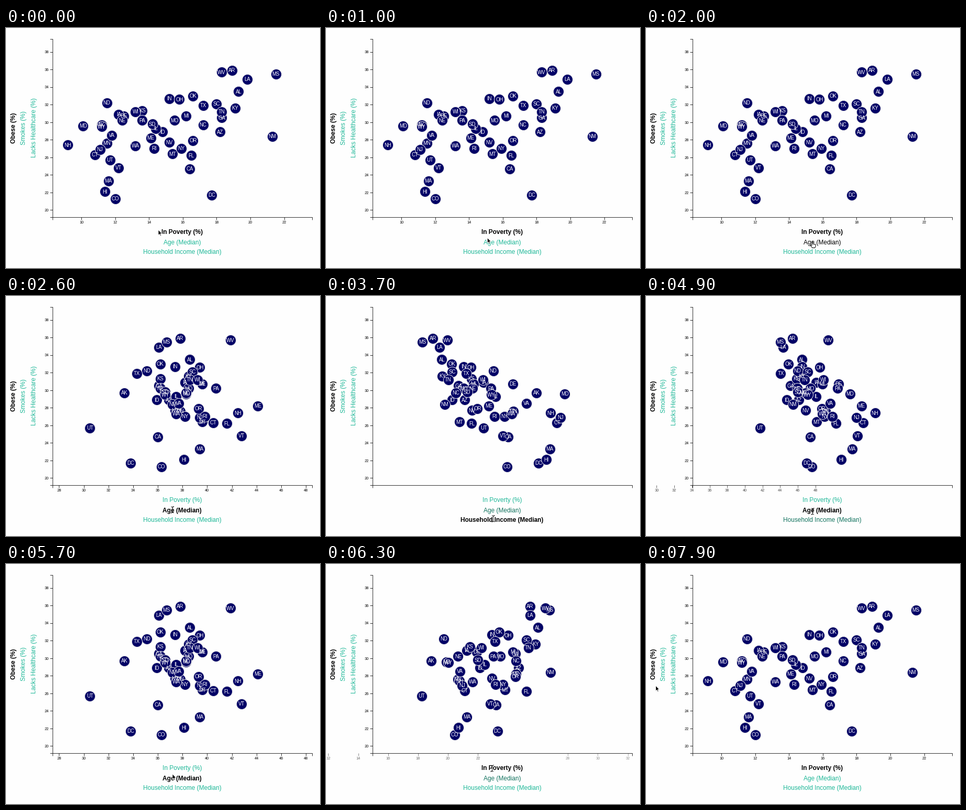
Animation of 600 by 458 pixels, one loop 8 s. Source, as a matplotlib script:

```python
import numpy as np
import matplotlib.pyplot as plt
from matplotlib.animation import FuncAnimation
from matplotlib.patches import Polygon

W, H, DPI = 600, 458, 100
STEP, FRAMES = 100, 80
MOVE_MS = 400
LEFT, RIGHT, TOP, BOTTOM = 88.5, 585, 20.8, 361.3
TEAL, NAVY = np.array([0x1f, 0xb8, 0x98]) / 255, "#000066"

CODES = ("AL AK AZ AR CA CO CT DE DC FL GA HI ID IL IN IA KS KY LA ME MD MA MI MN MS MO "
         "MT NE NV NH NJ NM NY NC ND OH OK OR PA RI SC SD TN TX UT VT VA WA WV WI WY").split()
POVERTY = np.array([
    19.3, 11.2, 18.2, 18.9, 16.4, 12, 10.8, 12.5, 17.7, 16.5, 18.3, 11.4, 14.8, 14.4, 15.2, 12.2, 13.6,
    19.1, 19.8, 14.1, 10.1, 11.6, 16.2, 11.5, 21.5, 15.5, 15.4, 12.4, 15.2, 9.2, 11.1, 21.3, 15.9, 17.2,
    11.5, 15.8, 16.6, 16.6, 13.6, 14.3, 18, 14.2, 18.3, 17.2, 11.7, 12.2, 11.8, 13.2, 18.3, 13.2, 11.2])
AGE = np.array([
    38.6, 33.3, 36.9, 37.8, 36, 36.3, 40.5, 39.6, 33.8, 41.6, 36.1, 38.1, 35.9, 37.5, 37.4, 38.2, 36.2,
    38.5, 36.1, 44.1, 38.3, 39.4, 39.6, 37.8, 36.7, 38.5, 39.6, 36.2, 37.4, 42.5, 39.4, 37.2, 38.2, 38.3,
    35.1, 39.4, 36.2, 39.3, 40.7, 39.8, 38.8, 36.6, 38.6, 34.3, 30.5, 42.8, 37.7, 37.5, 41.9, 39.2, 36.6])
INCOME = 1000 * np.array([
    42.8, 71.6, 50.1, 41.3, 61.9, 61.3, 70, 59.7, 71.6, 47.5, 49.3, 69.6, 47.9, 57.4, 49.4, 53.7, 52.5,
    43, 44.6, 49.5, 74, 69.2, 49.8, 61.5, 39.7, 48.4, 46.3, 52.7, 51.5, 66.5, 71.9, 44.8, 58.9, 46.6,
    59, 49.3, 47.5, 51.1, 53.2, 54.9, 45.2, 51, 44.4, 53, 60.9, 54.2, 64.9, 61.4, 41.1, 52.6, 57.1])
OBESITY = np.array([
    33.5, 29.7, 28.9, 35.9, 24.7, 21.3, 26.3, 30.7, 21.7, 26.2, 30.5, 22.1, 28.9, 29.3, 32.7, 30.9, 31.3,
    31.6, 34.9, 28.2, 29.6, 23.3, 30.7, 27.6, 35.5, 30.2, 26.4, 30.2, 27.7, 27.4, 26.9, 28.4, 27, 29.7,
    32.2, 32.6, 33, 27.9, 30.2, 27, 32.1, 29.8, 31.2, 31.9, 25.7, 24.8, 28.5, 27.3, 35.7, 31.2, 29.5])

SERIES = [POVERTY, AGE, INCOME]
TICKS = [range(10, 23, 2), range(28, 49, 2), range(40000, 80001, 5000)]

# (time, axis chosen) and (time, x, y) of the pointer
CLICKS = [(-1000, 0), (2056, 1), (3469, 2), (4666, 1), (6089, 0)]
POINTER = np.array([
    (0, 291, 385), (500, 292, 387), (1300, 318, 408), (2700, 318, 408),
    (3100, 319.5, 425), (4000, 319.5, 425), (4300, 318.5, 411), (5550, 318.5, 411),
    (5850, 317.5, 390), (6700, 317.5, 390), (7000, 150, 345), (7300, 66, 238),
    (7600, 32, 234), (7900, 18.5, 232)])


def scale(v, lo, hi, start, end):
    return start + (v - lo) / (hi - lo) * (end - start)


def x_pos(axis, v):
    data = SERIES[axis]
    return scale(v, data.min() * 0.9, data.max() * 1.1, LEFT, RIGHT)


def y_pos(v):
    return scale(v, OBESITY.min() * 0.9, OBESITY.max() * 1.1, BOTTOM, TOP)


def cubic(t):
    t = min(max(t, 0), 1)
    return 4 * t ** 3 if t < 0.5 else 1 - 4 * (1 - t) ** 3


def view(ms):
    """Previous axis, current axis and eased progress between them."""
    i = max(k for k, (start, _) in enumerate(CLICKS) if start <= ms)
    start, axis = CLICKS[i]
    return CLICKS[i - 1][1], axis, cubic((ms - start) / MOVE_MS)


def pointer(ms):
    return tuple(np.interp(ms, POINTER[:, 0], POINTER[:, k]) for k in (1, 2))


fig = plt.figure(figsize=(W / DPI, H / DPI), dpi=DPI, facecolor="#fefefe")
ax = fig.add_axes([0, 0, 1, 1])
ax.set(xlim=(0, W), ylim=(H, 0))
ax.axis("off")


def px(n):
    return n * 72 / DPI


def line(xs, ys, color="black", width=0.8, **kw):
    return ax.plot(xs, ys, color=color, lw=px(width), solid_capstyle="butt", **kw)[0]


def text(x, y, s, size, **kw):
    opts = dict(ha="center", va="baseline", family="Liberation Sans", fontsize=px(size))
    return ax.text(x, y, s, **{**opts, **kw})


# fixed axes
line([0, W], [457.5, 457.5], "#b4b4b4", 1)
line([84, LEFT, LEFT, 84], [TOP, TOP, BOTTOM, BOTTOM])
line([LEFT, LEFT, RIGHT, RIGHT], [366, BOTTOM, BOTTOM, 366])
for v in range(20, 39, 2):
    line([84, LEFT], [y_pos(v)] * 2)
    text(81.5, y_pos(v) + 2.7, str(v), 7.4, ha="right")

# moving ticks of the horizontal axis
ticks = [(axis, v, line([0, 0], [BOTTOM, 366]), text(0, 372.8, f"{v:,}", 7.4))
         for axis, values in enumerate(TICKS) for v in values]

# labels: the first three choose the horizontal axis
labels = [text(336.5, y, s, 11.9) for y, s in (
    (393.5, "In Poverty (%)"), (412.5, "Age (Median)"), (431.5, "Household Income (Median)"))]
side = dict(rotation=90, rotation_mode="anchor")
text(18.3, 190.5, "Obese (%)", 11.9, weight="bold", **side)
text(37, 190.5, "Smokes (%)", 11.9, color=TEAL, **side)
labels.append(text(56.5, 190.5, "Lacks Healthcare (%)", 11.9, **side))
BOXES = [(297, 383, 376, 396), (300, 402, 372, 415), (261, 421, 412, 434), (46, 133, 58, 248)]

# states
ys = y_pos(OBESITY)
dots = ax.scatter(x_pos(0, POVERTY), ys, s=px(20) ** 2, c=NAVY,
                  edgecolors="#e3e3e3", linewidths=px(1), zorder=3)
names = [text(0, y + 3.4, code, 9.7, color="white", zorder=4) for code, y in zip(CODES, ys)]

# pointer shapes, relative to the hot spot
ARROW = np.array([(0, 0), (0, 10.5), (2.4, 8.3), (4, 12), (5.6, 11.3), (4.1, 7.7), (7.2, 7.6)])
HAND = np.array([(-1, 0), (0.8, 0), (1, 4), (6, 5), (6, 8.5), (4.8, 11.5), (0, 11.5),
                 (-3.5, 7.5), (-3, 6), (-1, 7)])
BEAM = np.array([(-2.5, -6), (0, -5), (2.5, -6), (0, -5), (0, 5), (-2.5, 6), (0, 5), (2.5, 6)])
arrow = ax.add_patch(Polygon(ARROW, fc="black", ec="white", lw=px(0.9), zorder=6))
hand = ax.add_patch(Polygon(HAND, fc="white", ec="black", lw=px(1), zorder=6))
beam = line(BEAM[:, 0], BEAM[:, 1], "#222222", 1, zorder=6)


def hovered(ms):
    x, y = pointer(ms)
    for i, (x0, y0, x1, y1) in enumerate(BOXES):
        if x0 <= x <= x1 and y0 <= y <= y1:
            return i
    return None


def label_shades():
    """Darkness of each label per frame: 1 is black, 0 is teal."""
    shade, rows = np.array([1.0, 0, 0, 0]), []
    for i in range(FRAMES):
        lit = {view(i * STEP)[1], hovered(i * STEP)}
        goal = np.array([float(k in lit) for k in range(4)])
        shade = shade + np.clip(goal - shade, -0.21, 0.3)
        rows.append(shade)
    return rows


SHADES = label_shades()


def draw(i):
    ms = i * STEP
    old, now, e = view(ms)

    def between(a, b):
        return (1 - e) * a + e * b

    xs = between(x_pos(old, SERIES[old]), x_pos(now, SERIES[now]))
    dots.set_offsets(np.column_stack([xs, ys]))
    for name, x in zip(names, xs):
        name.set_x(x)

    for axis, v, mark, num in ticks:
        x = between(x_pos(old, v), x_pos(now, v))
        alpha = e if axis == now else 1 - e if axis == old else 0
        shown = alpha > 0.001 and -20 < x < W + 20
        for part in (mark, num):
            part.set_visible(shown)
            part.set_alpha(alpha)
        mark.set_xdata([x, x])
        num.set_x(x)

    for k, label in enumerate(labels):
        label.set_weight("bold" if k == now else "normal")
        label.set_color("black" if k == now else tuple(TEAL * (1 - SHADES[i][k])))

    spot, over = np.array(pointer(ms)), hovered(ms)
    arrow.set_xy(ARROW + spot)
    hand.set_xy(HAND + spot)
    beam.set_data(*(BEAM + spot).T)
    arrow.set_visible(over is None)
    beam.set_visible(over == now)
    hand.set_visible(over is not None and over != now)
    return []


anim = FuncAnimation(fig, draw, frames=FRAMES, interval=STEP, repeat=True, repeat_delay=0, blit=False)
plt.show()
```
